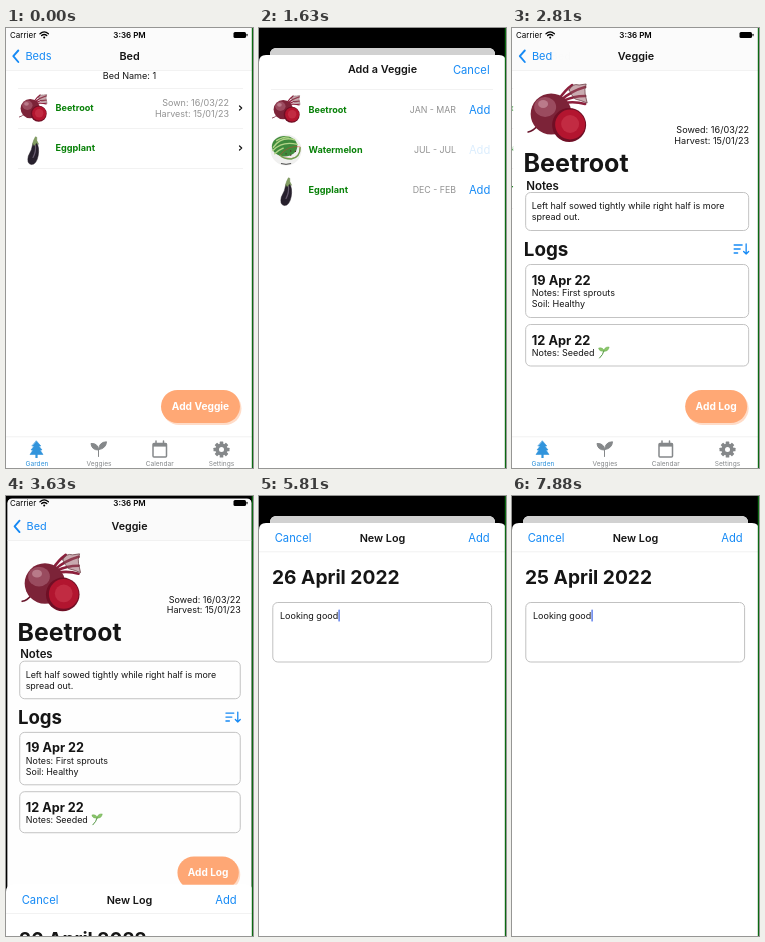
An HTML page for the animation above (8 s loop, 247 by 440 pixels).

```html
<!DOCTYPE html>
<html lang="en">
<head>
<meta charset="utf-8">
<title>Garden planner</title>
<style>
  html, body { margin: 0; width: 100%; height: 100%; overflow: hidden; background: #000; }
  svg { display: block; width: 100vw; height: 100vh; }
  text { font-family: Inter, "Liberation Sans", sans-serif; white-space: pre; }
</style>
</head>
<body>
<svg id="stage" viewBox="0 0 247 440"></svg>
<script>
const W = 247, H = 440, LOOP = 8000, TICK = 62.5;
const BLUE = '#168af5', GREEN = '#078007', GREY = '#929292', LINE = '#ececec', INK = '#151515';
const stage = document.getElementById('stage');
const pen = document.createElement('canvas').getContext('2d');

const clamp = v => Math.max(0, Math.min(1, v));
const smooth = v => v * v * (3 - 2 * v);

// Text is placed by the vertical centre of its capitals.
const text = (x, y, size, str, { fill = INK, weight = 400, anchor = 'start', opacity = 1 } = {}) =>
  `<text x="${x}" y="${y + size * .36}" font-size="${size}" font-weight="${weight}" fill="${fill}" text-anchor="${anchor}" opacity="${opacity}">${str}</text>`;
const rect = (x, y, w, h, fill, rx = 0, extra = '') =>
  `<rect x="${x}" y="${y}" width="${w}" height="${h}" rx="${rx}" fill="${fill}" ${extra}/>`;
const path = (d, stroke, width = 1, fill = 'none') =>
  `<path d="${d}" stroke="${stroke}" stroke-width="${width}" fill="${fill}" stroke-linecap="round" stroke-linejoin="round"/>`;
const circle = (x, y, r, fill) => `<circle cx="${x}" cy="${y}" r="${r}" fill="${fill}"/>`;
const ellipse = (x, y, rx, ry, fill, extra = '') =>
  `<ellipse cx="${x}" cy="${y}" rx="${rx}" ry="${ry}" fill="${fill}" ${extra}/>`;
const group = (x, y, body, opacity = 1, scale = 1) =>
  `<g transform="translate(${x} ${y}) scale(${scale})" opacity="${opacity}">${body}</g>`;
const rule = (y, x = 0, w = W) => rect(x, y, w, .7, LINE);
const outline = (y, h) => rect(12.5, y, 223, h, '#fff', 5, 'stroke="#bdbdbd" stroke-width=".9"');

// Vegetables, each in a 64 unit box
const beetroot =
  path('M34 16Q40 7 47 2M36 17Q46 8 60 4M38 18Q48 13 60 13M38 20Q50 18 60 21', '#8c1f3c', 2.6) +
  path('M44 7Q47 0 54 2L61 1Q59 7 60 11L62 20Q55 17 50 16Q46 12 44 7Z', '#6f4048', .8, '#94586280') +
  path('M12 43Q8 48 3 49', '#68152b', 1.6) +
  circle(26, 31, 20.5, '#7c2338') +
  ellipse(20, 24, 11, 10, '#b0667a', 'opacity=".6"') +
  ellipse(18, 21, 5, 4, '#d9aab6', 'opacity=".5"') +
  ellipse(44, 42, 17, 17, '#6f0f25') +
  ellipse(45, 41.5, 15, 15, '#b3152f') +
  ellipse(45, 41, 9, 9, '#c22b42');
const eggplant =
  path('M39 16Q46 28 43 46Q39 66 28 65Q18 63 22 47Q30 33 32 19Z', '#1d1722', 1, '#27202d') +
  path('M37 24Q39 37 32 50', '#665b6e', 2.5) +
  path('M31 22L33 14L37 6L40 7L40 14L44 22L39 19L36 24Z', '#6f8b52', 1, '#829d62');
const watermelon =
  circle(32, 32, 33, '#f0f0ef') +
  ellipse(29, 24, 27, 22, '#3f8a3c') +
  path('M5 26Q22 2 50 10M4 33Q24 12 56 20M12 12Q24 4 38 4M8 40Q16 32 26 28', '#b2d488', 3) +
  path('M19 43Q36 21 62 25Q63 47 43 50Q27 50 19 43Z', '#d8392f') +
  path('M19 43Q27 51 43 51Q62 48 62 27', '#6da150', 3) +
  [[32, 40], [42, 34], [52, 35], [42, 43]].map(([x, y]) => circle(x, y, 1.3, '#511b1f')).join('') +
  path('M22 61Q32 64 42 61', '#3a3a3a', 2);

const VEGGIES = { Beetroot: beetroot, Eggplant: eggplant, Watermelon: watermelon };
const thumb = (name, y) => group(12, y - 15, VEGGIES[name], 1, .47);
const veggieName = (name, y) => text(49.5, y, 9.1, name, { fill: GREEN, weight: 700 });

const statusBar = () =>
  text(4, 7, 8, 'Carrier', { fill: '#000' }) +
  path('M34 5.7Q38.2 2 42.4 5.7M35.6 7.6Q38.2 5.3 40.8 7.6', '#000', 1.3) + circle(38.2, 9.5, 1, '#000') +
  text(123.5, 7, 8, '3:36 PM', { fill: '#000', weight: 600, anchor: 'middle' }) +
  rect(227.5, 4, 12.5, 6, '#000', 1.5) + rect(240.5, 5.8, 1, 2.4, '#000', .5);

function navBar(back, title, shift, opacity) {
  return group(shift, 0,
    path('M12.3 22.5L7.3 28.2L12.3 34', BLUE, 1.9) +
    text(19.4, 28.2, 11, back, { fill: BLUE }) +
    text(123.5, 28.2, 10.8, title, { weight: 600, anchor: 'middle' }), opacity);
}

function button(x, w, label) {
  return rect(x + 1.5, 364, w, 33, '#ffdcc8', 16.5) + rect(x, 362, w, 33, '#ffa875', 16.5) +
    text(x + w / 2, 378.5, 10.2, label, { fill: '#fff', weight: 700, anchor: 'middle' });
}

function bedPage(names, pressed) {
  const rows = names.map((name, i) => {
    const y = 80 + i * 40;
    const dates = i ? '' :
      text(223, 75, 9, 'Sown: 16/03/22', { fill: GREY, anchor: 'end' }) +
      text(223, 86, 9, 'Harvest: 15/01/23', { fill: GREY, anchor: 'end' });
    const arrow = path(`M233.5 ${y - 2}l2.2 2l-2.2 2`, INK, 1.2);
    return rule(y + 20, 12, 225) +
      group(0, 0, thumb(name, y + 1) + veggieName(name, y) + dates + arrow, i ? 1 : 1 - .8 * pressed);
  }).join('');
  return rect(0, 42, W, 370, '#fff') +
    text(123.5, 48, 9.1, 'Bed Name: 1', { anchor: 'middle' }) + rule(60, 12, 225) + rows + button(155, 79, 'Add Veggie');
}

function logCard(y, h, date, lines) {
  return outline(y, h) + text(18.7, y + 15.5, 12.8, date, { weight: 700 }) +
    lines.map((line, i) => text(18.7, y + 28.5 + i * 11, 9, line)).join('');
}

function veggiePage() {
  const sprout = path('M86.5 330Q90 327 91 322', '#4f9440', 1) +
    path('M91 323Q86 324 85.5 320Q90 319 91 323ZM91 323Q91 318.5 96 319Q95 324 91 323Z', '#6fae55', .5, '#8cc76b');
  return rect(0, 42, W, 370, '#fff') + group(12, 55, beetroot) +
    text(236, 102, 9.1, 'Sowed: 16/03/22', { anchor: 'end' }) +
    text(236, 113, 9.1, 'Harvest: 15/01/23', { anchor: 'end' }) +
    text(10.3, 135, 25.1, 'Beetroot', { weight: 700 }) +
    text(13, 157.5, 11.5, 'Notes', { weight: 600 }) +
    outline(164.5, 38) +
    text(18.5, 178, 9, 'Left half sowed tightly while right half is more') +
    text(18.5, 189, 9, 'spread out.') +
    text(10.7, 221, 18.8, 'Logs', { weight: 700 }) +
    path('M221 217h8M221 221h6M221 225h3.5M233 216v10M230.5 223.5l2.5 2.5l2.5 -2.5', BLUE, 1.3) +
    logCard(236.5, 53, '19 Apr 22', ['Notes: First sprouts', 'Soil: Healthy']) +
    logCard(296.5, 41.5, '12 Apr 22', ['Notes: Seeded']) + sprout + button(172, 62, 'Add Log');
}

function tabBar() {
  const active = '#3194dc', idle = '#85888a';
  const gear = Array.from({ length: 8 }, (_, i) =>
    rect(-1.8, -8, 3.6, 5, idle, .6, `transform="rotate(${i * 45})"`)).join('') + circle(0, 0, 6.1, idle) + circle(0, 0, 2.5, '#fff');
  const label = (x, name, fill) => text(x, 436, 6.6, name, { fill, anchor: 'middle' });
  return rect(0, 409, W, 31, '#fff') + rule(408.5) +
    path('M30.5 413l4.3 5h-2l3.2 4h-2l3 4.5h-13l3-4.5h-2l3.2-4h-2Z', active, .6, active) + rect(29.4, 426, 2.2, 4, active) +
    path('M92.5 428.5v-6.5Q85.5 422 85 415.5Q92 415 92.5 422Q93 414 100.5 413.8Q100 420.5 93 421.5', idle, 1, idle) +
    rect(147, 415.5, 13.5, 13.5, 'none', 1, `stroke="${idle}" stroke-width="1.5"`) + rect(147, 415, 13.5, 3.6, idle) +
    path('M150 413v2M157.5 413v2', idle, 1.5) + group(215.5, 421.5, gear) +
    label(31, 'Garden', active) + label(93, 'Veggies', idle) + label(153.7, 'Calendar', idle) + label(215.5, 'Settings', idle);
}

// Sheets are drawn in stage coordinates for their open position.
function sheet(progress, content) {
  return progress <= 0 ? '' : group(0, (1 - progress) * (H - 27),
    `<path d="M0 450V34Q0 27 7 27H240Q247 27 247 34V450Z" fill="#fff"/>` + content);
}

function addSheet(pressed) {
  const rows = [['Beetroot', 'JAN - MAR'], ['Watermelon', 'JUL - JUL'], ['Eggplant', 'DEC - FEB']].map(([name, months], i) => {
    const y = 82 + i * 40;
    return thumb(name, y) + veggieName(name, y) +
      text(197, y, 8.8, months, { fill: GREY, anchor: 'end' }) +
      text(231.3, y, 11.2, 'Add', { fill: BLUE, anchor: 'end', opacity: pressed && i === 1 ? .15 : 1 });
  }).join('');
  return text(123.5, 41.5, 10.8, 'Add a Veggie', { weight: 600, anchor: 'middle' }) +
    text(230.6, 41.5, 11.2, 'Cancel', { fill: BLUE, anchor: 'end' }) + rule(61, 12, 222) + rows;
}

function calendar(selected) {
  const column = i => 29 + i * 31.5;
  const days = Array.from({ length: 30 }, (_, i) => {
    const day = i + 1, x = column((i + 5) % 7), y = 152 + Math.floor((i + 5) / 7) * 28;
    const chosen = day === selected, today = day === 26;
    const mark = chosen ? circle(x, y, 12.5, today ? '#007aff' : '#d9ebff') : '';
    const fill = chosen && today ? '#fff' : chosen || today ? '#007aff' : INK;
    return mark + text(x, y, 12, day, { fill, weight: chosen ? 600 : 400, anchor: 'middle' });
  }).join('');
  return text(19, 112, 11, 'April 2022', { weight: 600 }) +
    path('M82 108.5l3.5 3.5l-3.5 3.5M200 107l-5 5l5 5M222 107l5 5l-5 5', '#007aff', 1.5) +
    ['SUN', 'MON', 'TUE', 'WED', 'THU', 'FRI', 'SAT'].map((d, i) =>
      text(column(i), 131, 8, d, { fill: '#b8b8bb', weight: 600, anchor: 'middle' })).join('') + days;
}

function caretOpacity(k) {
  if (k < 68) return 0;
  if (k >= 72 && k < 76) return [.7, .35, 0, 0][k - 72];
  if (k >= 96 && k < 100) return .9;
  if (k >= 100 && k < 104) return [.6, .3, .1, 0][k - 100];
  return 1;
}

function logSheet(k) {
  const day = k < 117 ? 26 : 25;
  const count = k < 79 ? 0 : k < 83 ? 1 : Math.min(12, k - 81);
  const typed = 'Looking good'.slice(0, count);
  pen.font = '9px Inter, "Liberation Sans", sans-serif';
  const caretX = 21.3 + pen.measureText(typed).width;
  const open = k >= 109 && k < 123;
  const fade = clamp((k - 108) / 4) - clamp((k - 119) / 4);
  const pressed = k === 108 || k === 109;
  const notes = rect(13.8, 106.5, 218.8, 59.5, '#fff', 5, 'stroke="#c1c1c1" stroke-width="1"') +
    (count ? text(21, 119.5, 9, typed) : text(21, 119.5, 9, 'Notes', { fill: '#cfcfd1' })) +
    rect(caretX, 113.5, 1.2, 12, '#3a62e8', .5, `opacity="${caretOpacity(k)}"`);
  return text(15.7, 42, 11.2, 'Cancel', { fill: BLUE }) +
    text(123.5, 42, 10.8, 'New Log', { weight: 600, anchor: 'middle' }) +
    text(230.7, 42, 11.2, 'Add', { fill: BLUE, anchor: 'end' }) + rule(55.5) +
    text(13, 81, 19.2, `${day} April 2022`, { weight: 700, opacity: pressed ? .3 : 1 }) +
    (open ? group(0, 0, calendar(day), fade) : '') + group(0, open ? 200 : 0, notes);
}

function render(k) {
  const ramp = (from, to) => smooth(clamp((k - from) / (to - from)) ** .94);
  const adding = ramp(14, 19) - ramp(26, 32);
  const logging = ramp(57, 62);
  const raised = Math.max(adding, logging);
  const push = 1 - (1 - clamp((k - 40) / 6)) ** 3;
  const scale = 1 - .089 * raised;
  const names = ['Beetroot', 'Eggplant', ...(k >= 27 ? ['Watermelon'] : [])];

  const page = rect(0, 0, W, H, '#fff') +
    (push < 1 ? group(-75 * push, 0, bedPage(names, k >= 40 ? 1 - push * .5 : 0)) : '') +
    (push > 0 ? group(W * (1 - push), 0, veggiePage()) : '') +
    rect(0, 0, W, 42, '#fbfbfb') + rule(42) +
    navBar('Beds', 'Bed', -75 * push, 1 - push) +
    (push > 0 ? navBar('Bed', 'Veggie', 110 * (1 - push), push) : '') +
    tabBar() + rect(0, 0, W, H, '#000', 0, `opacity="${.17 * raised ** 2}"`);

  stage.innerHTML = rect(0, 0, W, H, '#000') +
    `<clipPath id="card">${rect(0, 0, W, H, '#000', Math.min(7, 40 * raised))}</clipPath>` +
    group(W / 2 * (1 - scale), 20 * raised, `<g clip-path="url(#card)">${page}</g>`, 1, scale) +
    statusBar() + sheet(adding, addSheet(k >= 26)) + sheet(logging, logSheet(k)) +
    rect(245.8, 0, 1.2, H, '#0b6a12');
}

// The picture advances sixteen times a second.
let shown = -1;
function frame() {
  const k = Math.floor((performance.now() % LOOP) / TICK + .1) % (LOOP / TICK);
  if (k !== shown) render(shown = k);
  requestAnimationFrame(frame);
}
frame();
</script>
</body>
</html>
```
